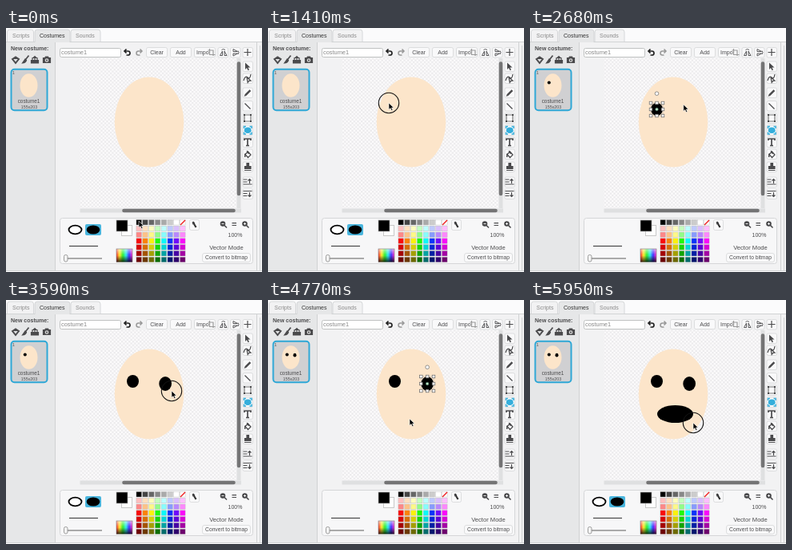
Write an HTML page that moves like this. It is 320 by 306 pixels and loops after 5.99 s.

```html
<!DOCTYPE html>
<html lang="en">
<head>
<meta charset="utf-8">
<title>Drawing a face</title>
<style>
html, body { margin: 0; width: 100%; height: 100%; overflow: hidden; background: #fbfbfc; }
svg { display: block; width: 320px; height: 306px; }
text { font: 7px "Liberation Sans", Arial, sans-serif; fill: #4c4c4e; }
.mid { text-anchor: middle; }
.icon { fill: none; stroke: #4a4a4c; stroke-width: 1.2; }
.solid { fill: #4a4a4c; }
.btn { fill: #f9f9fa; stroke: #d2d3d4; stroke-width: .7; }
.face { fill: #fce5ca; }
.handle { fill: #fff; stroke: #666; stroke-width: .7; }
</style>
</head>
<body>
<svg viewBox="0 0 320 306">
  <defs>
    <pattern id="check" width="4.64" height="4.64" patternUnits="userSpaceOnUse">
      <path fill="#fdfcfd" d="M0 0h5v5H0z"/>
      <path fill="#ebeaec" d="M0 0h2.320v2.320H0zM2.320 2.320H5V5H2.320z"/>
    </pattern>
    <linearGradient id="hues">
      <stop stop-color="#f33"/><stop offset=".2" stop-color="#fe3"/>
      <stop offset=".4" stop-color="#3e3"/><stop offset=".6" stop-color="#3ee"/>
      <stop offset=".8" stop-color="#43f"/><stop offset="1" stop-color="#f3c"/>
    </linearGradient>
    <linearGradient id="shade" x2="0" y2="1">
      <stop stop-color="#fff" stop-opacity=".6"/><stop offset=".45" stop-color="#fff" stop-opacity="0"/>
      <stop offset=".5" stop-opacity="0"/><stop offset="1" stop-opacity=".8"/>
    </linearGradient>
  </defs>

  <!-- panels and tabs -->
  <path fill="#e6e7e8" d="M0 17h62v288H0z"/>
  <rect x="61.500" y="17.500" width="252" height="287" fill="#f2f2f3" stroke="#d0d2d3"/>
  <path fill="#f2f2f3" d="M314 18h6v287h-6z"/>
  <path stroke="#d0d2d3" d="M0 17.500h320M0 304.500h320M317.500 22v282"/>
  <g fill="#f2f2f3" stroke="#cfd1d2" stroke-width=".8">
    <path d="M1.500 17.500V5q0-3 3-3h27q3 0 3 3v12.500z"/>
    <path d="M81 17.500V5q0-3 3-3h31q3 0 3 3v12.500z"/>
    <path fill="#e6e7e8" d="M36 18V5q0-3 3-3h38q3 0 3 3v13"/>
  </g>
  <text x="8" y="11.500" style="fill:#888">Scripts</text>
  <text x="42" y="11.500" style="fill:#333">Costumes</text>
  <text x="87" y="11.500" style="fill:#888">Sounds</text>

  <!-- costume list -->
  <text x="6" y="28" style="font-weight:bold">New costume:</text>
  <g class="icon">
    <path class="solid" d="M7.500 39l4.500-3 4.500 3-4.500 5.500z"/>
    <path d="M10.500 39.500h3l-1.500 2z" style="stroke:#e6e7e8"/>
    <path d="M28.500 34.500l-4 5" stroke-width="1.700"/>
    <path class="solid" d="M24 39l1.500 1.500q-1 3-5 3.500z"/>
    <path class="solid" d="M31.500 40.500h9V44h-9z"/>
    <path d="M33 40v-2.500h6V40M36 40v-4.500m-2 2l2-2 2 2"/>
    <path class="solid" d="M46.500 37.500h2l1-1.500h3l1 1.500h2v6h-9z"/>
    <circle cx="51" cy="40.500" r="1.700" style="stroke:#ddd"/>
  </g>
  <rect x="6.500" y="51.700" width="45" height="51.500" rx="4" fill="#d0d0d2" stroke="#2fa8d6" stroke-width="2"/>
  <text x="8" y="57.500" style="font-size:5px">1</text>
  <ellipse class="face" cx="28.500" cy="72" rx="11" ry="14.800"/>
  <circle id="dot1" cx="23.800" cy="68.500" r="2"/>
  <ellipse id="dot2" cx="33.500" cy="69.200" rx="2" ry="2.400"/>
  <text class="mid" x="28.500" y="94" style="font-size:6.400px">costume1</text>
  <text class="mid" x="29" y="101" style="font-size:5.300px">155x203</text>

  <!-- top bar -->
  <rect x="67.500" y="25.500" width="76" height="11" rx="2" fill="#fff" stroke="#b9bbbc" stroke-width=".9"/>
  <text x="69" y="33.300" style="font-size:7.400px;fill:#888">costume1</text>
  <g class="icon" stroke-width="1.500">
    <path d="M148 29h4.500a2.500 2.500 0 0 1 0 5h-2M150.500 26.500L148 29l2.500 2.500" style="stroke:#222;stroke-width:1.700"/>
    <path d="M170 29h-4.500a2.500 2.500 0 0 0 0 5h2M167.500 26.500L170 29l-2.500 2.500" style="stroke:#999;stroke-width:1.500"/>
  </g>
  <g id="buttons"></g>
  <text class="mid" x="188.500" y="33">Clear</text>
  <text class="mid" x="218.500" y="33">Add</text>
  <text x="238" y="33">Impo</text>
  <g class="icon">
    <path d="M254.500 26v7.500h7M252.500 28h6.500v7" style="stroke:#999"/>
    <g style="stroke-width:.9">
      <path d="M267.500 34.500l3-5.500v5.500zM273 29l3 5.500h-3zM269.500 27.500q2-2 4.500 0"/>
      <path d="M284 29.500h5.500l-5.500-3zM284 32h5.500l-5.500 3zM290 28.500q2 2 0 4.500"/>
    </g>
    <path d="M302 26v9M297.500 30.500h9"/>
  </g>

  <!-- canvas -->
  <path fill="url(#check)" d="M92.500 38h196v188h-196z"/>
  <path fill="#dfe0e1" d="M288.500 38h5v188h-5zM92.500 226.500H294v5H92.500z"/>
  <path stroke="#747475" stroke-width="4.600" stroke-linecap="round" d="M291 44.500v163.500M147.500 229h137"/>
  <ellipse class="face" cx="179" cy="118" rx="43.300" ry="56.500"/>
  <g id="shapes"></g>
  <g id="selection"></g>

  <!-- drawing tools -->
  <g class="icon">
    <path class="solid" stroke="none" d="M299 43.500l6.500 6h-3l1.500 3-1.500.8-1.500-3.200-2 2z"/>
    <path d="M297 66q2-7 5-4t4-4M301 62l5 4-2.500.3-1.300 2z"/>
    <path d="M304.500 77.500l-5.500 5.500-1 2.500 2.500-1 5.500-5.500z" class="solid" stroke-width=".5"/>
    <path d="M298.500 94.500l7 7"/>
    <path d="M298 109h8v8h-8z" style="stroke:#777"/>
    <path d="M297 109h2m6 0h2M297 117h2m6 0h2" stroke-width="2" style="stroke-width:2"/>
    <g style="stroke:#35aedb">
      <ellipse cx="302.200" cy="128.200" rx="3.900" ry="3.200" fill="#35aedb"/>
      <path d="M297.500 126v-2.500h2.500M304.500 123.500h2.500v2.500M297.500 130.500v2.500h2.500M304.500 133h2.500v-2.500" style="stroke-width:1.500"/>
    </g>
    <path d="M298 141v-2h8v2M302 139v8.500M300 147.500h4" style="stroke-width:1.700"/>
    <path d="M299 158.500l3.500-3.500 3.500 4-3.500 3.500zM301 154l2.500 4"/>
    <path class="solid" d="M298 158l1.500-1v5h-1.500z" stroke="none"/>
    <path class="solid" d="M301 169.500h2.500v4h2.500v3h-7.500v-3h2.500zM298 178.500h8.500"/>
    <path d="M296.500 190h5M296.500 193h5M296.500 196h11M304.500 195v-5.500m-2 2l2-2 2 2"/>
    <path d="M296.500 204.500h11M296.500 207.500h5M296.500 210.500h5M304.500 206v5.500m-2-2l2 2 2-2"/>
  </g>

  <!-- options -->
  <rect x="67.500" y="238.500" width="241" height="57" rx="3" fill="#f7f7f8" stroke="#d5d6d8"/>
  <g id="options">
    <ellipse cx="86.500" cy="253" rx="8" ry="5.300" fill="#fff" stroke="#000" stroke-width="1.800"/>
    <rect x="99" y="246" width="20" height="14" rx="2" fill="#49b5dd"/>
    <ellipse cx="109" cy="253" rx="8.300" ry="5.500"/>
  </g>
  <path stroke="#333" d="M79 273.500h36"/>
  <path stroke="#aaa" stroke-width="2" d="M76 289h44"/>
  <rect x="72.500" y="284.500" width="4.500" height="8.500" rx="2" fill="#f4f4f4" stroke="#888" stroke-width=".8"/>
  <rect x="144.500" y="247.500" width="13" height="13" fill="#fff" stroke="#bbb" stroke-width=".8"/>
  <rect x="138" y="241" width="14" height="14" stroke="#aaa" stroke-width=".7"/>
  <rect x="138" y="277" width="20" height="16.500" fill="url(#hues)"/>
  <rect x="138" y="277" width="20" height="16.500" fill="url(#shade)" stroke="#777" stroke-width=".6"/>
  <g id="palette"></g>
  <path stroke="#e22" stroke-width="1.400" d="M218 247l6-6"/>
  <rect class="btn" x="229.500" y="240.500" width="12" height="13" rx="2"/>
  <g class="icon">
    <path d="M233.500 243l4 7" style="stroke:#333;stroke-width:2.200"/>
    <path d="M233 246l3-2"/>
    <g id="zoom">
      <circle class="solid" cx="271" cy="245.500" r="2.700"/>
      <path d="M273 247.500l3 3" style="stroke-width:1.600"/>
      <path d="M269.500 245.500h3" style="stroke:#fff;stroke-width:.9"/>
    </g>
    <use href="#zoom" x="27.500"/>
    <path d="M298.500 244v3" style="stroke:#fff;stroke-width:.9"/>
    <path d="M282.500 244.700h5.500M282.500 247.500h5.500"/>
  </g>
  <text class="mid" x="286.500" y="261.500">100%</text>
  <text class="mid" x="275.500" y="278" style="font-size:7.600px">Vector Mode</text>
  <rect class="btn" x="245.500" y="282.500" width="60" height="11" rx="2.500"/>
  <text class="mid" x="275.500" y="290.300" style="font-size:6.700px">Convert to bitmap</text>

  <g id="pointer">
    <circle id="press" r="12.700" fill="none" stroke="#111" stroke-width="1.100"/>
    <path d="M0 0v8.300l2-1.700 1.400 3 1.500-.7-1.400-2.900h2.600z" stroke="#fff" stroke-width=".6"/>
  </g>
</svg>
<script>
const LOOP = 5990;
const $ = id => document.getElementById(id);

function add(parent, tag, attrs) {
  const el = document.createElementNS("http://www.w3.org/2000/svg", tag);
  for (const key in attrs) el.setAttribute(key, attrs[key]);
  return $(parent).appendChild(el);
}
function show(el, on) { el.style.display = on ? "" : "none"; }

function addButton(x, y, width = 12.5, height = 12.5) {
  add("buttons", "rect", { class: "btn", x, y, width, height, rx: 2 });
}
[175.5, 205.5, 235.5].forEach(x => addButton(x, 24.5, 26, 12));
[265, 280.5, 296].forEach(x => addButton(x, 24.5));
[42, 57, 75, 91.5, 107, 122, 137, 152, 168, 187, 202].forEach(y => addButton(296, y));

// palette: a row of greys above rows of tints and shades
const greys = ["#000", "#444", "#666", "#888", "#aaa", "#ccc", "#fff", "#fff"];
const hues = [0, 30, 58, 115, 180, 230, 265, 300];
const lights = [87, 76, 51, 43, 33, 22];
for (let row = 0; row < 7; row++) {
  for (let col = 0; col < 8; col++) {
    add("palette", "rect", {
      x: 162.9 + col * 7.8, y: 240.4 + row * 7.8, width: 6.6, height: 6.6,
      fill: row ? `hsl(${hues[col]} 95% ${lights[row - 1]}%)` : greys[col],
      stroke: "#bbb", "stroke-width": .4
    });
  }
}

// pointer: time, x, y
const path = [
  [0, 166, 242], [300, 166, 242], [800, 152.5, 96], [1000, 152.5, 96],
  [1300, 151, 94], [1450, 151, 94], [1870, 166, 110], [2150, 166, 110],
  [2600, 192, 96], [2850, 191.3, 96], [3480, 207, 114], [3750, 207, 114],
  [4600, 177, 149], [4800, 177, 149], [5120, 159, 132], [5260, 159, 132],
  [5880, 204, 154], [LOOP, 204, 154]
];
function pointerAt(t) {
  const i = Math.max(1, path.findIndex(p => p[0] >= t));
  const [t0, x0, y0] = path[i - 1], [t1, x1, y1] = path[i];
  const u = (t - t0) / (t1 - t0), k = u * u * (3 - 2 * u);
  return [x0 + (x1 - x0) * k, y0 + (y1 - y0) * k];
}

// each oval is dragged from its corner between down and up
const drags = [
  { x: 151, y: 94, down: 1400, up: 2080 },
  { x: 191.3, y: 96, down: 2800, up: 3700 },
  { x: 159, y: 132, down: 5220, up: LOOP }
].map(d => ({ ...d, el: add("shapes", "ellipse", {}) }));

function placeOval({ el, x, y, up }, t) {
  const [px, py] = pointerAt(Math.min(t, up));
  const rx = Math.max(0, px - x) / 2, ry = Math.max(0, py - y) / 2;
  const attrs = { cx: x + rx, cy: y + ry, rx, ry };
  for (const key in attrs) el.setAttribute(key, attrs[key]);
}

const frames = drags.slice(0, 2).map(({ x, y, up }) => {
  const [px, py] = pointerAt(up), cx = (x + px) / 2, cy = (y + py) / 2;
  const group = add("selection", "g", {});
  const put = (tag, attrs) => group.appendChild(add("selection", tag, attrs));
  put("rect", { x, y, width: px - x, height: py - y, fill: "none", stroke: "#aaa", "stroke-width": .5 });
  for (const hx of [x, cx, px]) for (const hy of [y, cy, py]) {
    if (hx === cx && hy === cy) continue;
    put("rect", { class: "handle", x: hx - 1.8, y: hy - 1.8, width: 3.6, height: 3.6 });
  }
  put("circle", { cx, cy, r: 1.8, fill: "#bfe5c5", stroke: "#476", "stroke-width": .6 });
  put("circle", { class: "handle", cx, cy: y - 11.8, r: 2.3 });
  return group;
});

function draw(t) {
  const [x, y] = pointerAt(t);
  $("pointer").setAttribute("transform", `translate(${x} ${y})`);
  show($("press"), drags.some(d => t >= d.down && t < d.up));
  drags.forEach(d => {
    show(d.el, t >= d.down);
    placeOval(d, t);
  });
  let selected = false;
  frames.forEach((group, i) => {
    const on = t >= drags[i].up && t < drags[i + 1].down;
    show(group, on);
    selected ||= on;
  });
  show($("options"), !selected);
  show($("dot1"), t >= drags[0].up);
  show($("dot2"), t >= drags[1].up);
}

const start = performance.now();
function tick() {
  draw((performance.now() - start) % LOOP);
  requestAnimationFrame(tick);
}
tick();
</script>
</body>
</html>
```
